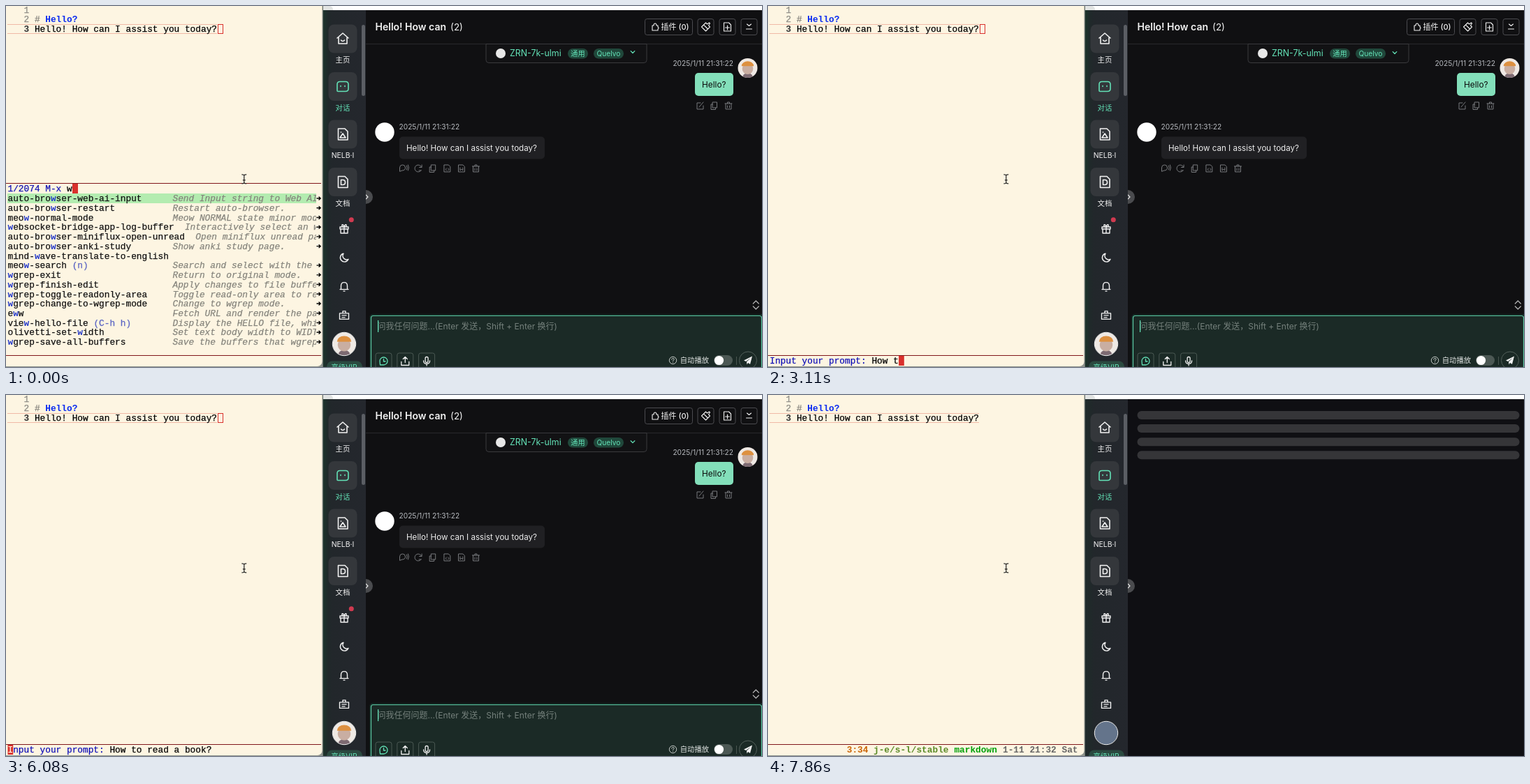
Animation of 1082 by 518 pixels, one loop 8000 ms. Source, as an HTML page with a canvas:

```html
<!DOCTYPE html>
<html lang="zh-CN">
<head>
<meta charset="utf-8">
<title>Prompt to chat</title>
<style>
html, body { margin: 0; width: 100%; height: 100%; overflow: hidden; background: #111; }
canvas { display: block; width: 1082px; height: 518px; }
</style>
</head>
<body>
<canvas id="stage" width="1082" height="518"></canvas>
<script>
const g = document.getElementById('stage').getContext('2d');
const LOOP = 8000, PROMPT_AT = 445, SENT_AT = 6075, LOAD_AT = 6225, SHELL_AT = 7265;
const CH = 7.68, ROW = 13.73, X0 = 2.5;
const MINT = '#63e2b7', RED = '#d9302c', PAPER = '#fdf5e2', RULE = '#80161a', DIM = '#77797c', WHITE = '#f2f2f2';

const PROMPT = 'How to read a book?';
const KEYS = [2065, 2215, 2505, 2655, 2955, 3255, 3330, 3405, 3555, 3705,
  3855, 4005, 4155, 4445, 4595, 4745, 4895, 5035, 5245];

const COMMANDS = [
  ['auto-browser-web-ai-input', 'Send Input string to Web AI'],
  ['auto-browser-restart', 'Restart auto-browser.'],
  ['meow-normal-mode', 'Meow NORMAL state minor mode.'],
  ['websocket-bridge-app-log-buffer', 'Interactively select an websocket'],
  ['auto-browser-miniflux-open-unread', 'Open miniflux unread page.'],
  ['auto-browser-anki-study', 'Show anki study page.'],
  ['mind-wave-translate-to-english', ''],
  ['meow-search', 'Search and select with the current', '(n)'],
  ['wgrep-exit', 'Return to original mode.'],
  ['wgrep-finish-edit', 'Apply changes to file buffers.'],
  ['wgrep-toggle-readonly-area', 'Toggle read-only area to remove'],
  ['wgrep-change-to-wgrep-mode', 'Change to wgrep mode.'],
  ['eww', 'Fetch URL and render the page.'],
  ['view-hello-file', 'Display the HELLO file, which', '(C-h h)'],
  ['olivetti-set-width', 'Set text body width to WIDTH'],
  ['wgrep-save-all-buffers', 'Save the buffers that wgrep']
];

function rect(x, y, w, h, color) {
  g.fillStyle = color;
  g.fillRect(x, y, w, h);
}

function box(x, y, w, h, r, fill, line, lw = 1) {
  g.beginPath();
  g.roundRect(x, y, w, h, r);
  if (fill) { g.fillStyle = fill; g.fill(); }
  if (line) { g.strokeStyle = line; g.lineWidth = lw; g.stroke(); }
}

function disc(x, y, r, fill, line, lw = 1) {
  g.beginPath();
  g.arc(x, y, r, 0, 7);
  if (fill) { g.fillStyle = fill; g.fill(); }
  if (line) { g.strokeStyle = line; g.lineWidth = lw; g.stroke(); }
}

// y is the middle of the capitals
function label(s, x, y, size, color, align = 'left', weight = 400) {
  g.font = `${weight} ${size}px Inter, "Noto Sans CJK SC", "Noto Sans CJK", sans-serif`;
  g.textAlign = align;
  g.fillStyle = color;
  g.fillText(s, x, y + size * 0.36);
}

// A hairline outline gives the medium weight
function mono(s, x, y, color, style = '') {
  g.font = `${style} 12.8px "Liberation Mono", monospace`;
  g.textAlign = 'left';
  g.fillStyle = g.strokeStyle = color;
  g.fillText(s, x, y + 4.2);
  if (style === 'bold') return;
  g.lineWidth = 0.25;
  g.strokeText(s, x, y + 4.2);
}

function icon(x, y, d, color, lw = 1.1, fill = false) {
  const path = new Path2D(d);
  g.save();
  g.translate(x, y);
  g.strokeStyle = g.fillStyle = color;
  g.lineWidth = lw;
  g.lineJoin = g.lineCap = 'round';
  if (fill) g.fill(path);
  else g.stroke(path);
  g.restore();
}

const ICON = {
  home: 'M-8-1 0-8 8-1M-6-2V7H6V-2M-2.5 2Q0 5 2.5 2',
  chat: 'M-4-7H4Q8-7 8-3V3Q8 7 4 7H-7Q-8 7-8 6V-3Q-8-7-4-7ZM-3-1V0M3-1V0',
  page: 'M-6.5-8H3L7-4V8H-6.5Z',
  hill: 'M-4 5 0-1 4 5ZM-2.5-3V-2.8',
  letter: 'M-2.5-3H0Q3.5-3 3.5 0.5Q3.5 4 0 4H-2.5Z',
  gift: 'M-6-3H6V0H-6ZM-5 0V6H5V0M0-3V6M0-3Q-4-3-3-6Q-1-7 0-3Q1-7 3-6Q4-3 0-3',
  moon: 'M-1-6A6 6 0 1 0 6 2A5.5 5.5 0 0 1-1-6Z',
  bell: 'M-6 4H6M-4.5 4V-1Q-4.5-6 0-6Q4.5-6 4.5-1V4M-1 6.5H1',
  case: 'M-6.5-3H6.5V5.5H-6.5ZM-2-3V-6H2V-3M-3 0H3M-3 3H1',
  edit: 'M1-4H-4V5H5V0M-1 2 5-5',
  copy: 'M-2-5H4V3H-2ZM-2-2H-4.5V5.5H2V3',
  bin: 'M-5-3H5M-4-3V5H4V-3M-1.5-3V-5H1.5V-3M-1.5 0V3M1.5 0V3',
  voice: 'M-6 4V-1Q-6-5-2-5Q2-5 2-1Q2 3-2 3ZM4-4Q5.5-1 4 2M6-5Q8-1 6 3',
  redo: 'M4 3A5 5 0 1 1 4.5-2M5-5V-1.5H1.5M4 3H1',
  file: 'M-4-5H2L4.5-2.5V5H-4Z',
  code: 'M-1 0-2 1.5-1 3M1.5 0 2.5 1.5 1.5 3',
  word: 'M-2-1V3L0 1 2 3V-1',
  plug: 'M-4-2H-2Q-2-5 0-5Q2-5 2-2H4V0Q6 2 4 3V5H-4Z',
  brush: 'M-6 0 0-6 2-4 5-6 6-5 4-2 6 0 0 6ZM-3-3 3 3',
  addFile: 'M-5-6H2L5-3V6H-5ZM0-2V4M-3 1H3',
  fold: 'M-3-4 0-1.5 3-4M-4 3H4',
  down: 'M-2.8-1.4 0 1.4 2.8-1.4',
  upDown: 'M-4-2 0-6 4-2M-4 2 0 6 4 2',
  clock: 'M-5 5.5H0A5.5 5.5 0 1 0-5.5 0ZM0-3V0.5H2.5',
  share: 'M-5.5 1V6H5.5V1M0 2V-6M-3-3 0-6 3-3',
  mic: 'M-2-4Q-2-6 0-6Q2-6 2-4V0Q2 2 0 2Q-2 2-2 0ZM-4.5-0.5Q-4.5 4 0 4Q4.5 4 4.5-0.5M0 4V6.5',
  plane: 'M-6 0 6-6 3 5.5 0 3.5-1.5 6-2 2 4-3.5-3 1.5Z',
  ask: 'M-1.7-1.3Q-1.5-3 0-3Q2-3 1.7-1.2Q0 0 0 1M0 3V3.1'
};

// Plain faceless head and shoulders on a pale disc
function portrait(x, y, r) {
  g.save();
  disc(x, y, r, '#efe9e4');
  g.clip();
  g.translate(x, y);
  g.scale(r, r);
  disc(0, 1.05, 0.55, '#7d6a72');
  disc(0, 0.08, 0.56, '#c9aea2');
  g.beginPath();
  g.ellipse(0, -0.2, 0.62, 0.5, 0, Math.PI, 0);
  g.fillStyle = '#dd9040';
  g.fill();
  g.restore();
}

const blinkOn = idle => idle < 500 || Math.floor(idle / 500) % 2 === 0;

function drawCommands() {
  rect(0, 254, 451, 1, RULE);
  mono('1/2074 M-x', X0, 262, '#1414b4');
  mono('w', X0 + 11 * CH, 262, '#000');
  rect(95, 255, 8, 14, RED);
  rect(2, 269, 442, 14, '#b3ecb0');
  COMMANDS.forEach(([name, note, key], i) => {
    const y = 276 + i * ROW, at = name.indexOf('w');
    mono(name.slice(0, at), X0, y, '#111');
    mono('w', X0 + at * CH, y, '#1f35c8', 'bold');
    mono(name.slice(at + 1), X0 + (at + 1) * CH, y, '#111');
    if (key) mono(key, X0 + (name.length + 1) * CH, y, '#5c66c4');
    if (!note) return;
    g.save();
    g.beginPath();
    g.rect(0, y - 8, 444, 16);
    g.clip();
    mono(note, name.length > 29 ? X0 + (name.length + 2) * CH : 238.5, y, '#85847c', 'italic');
    g.restore();
    icon(447.5, y, 'M-2.5 0H2.5M0.5-2 2.7 0 0.5 2', '#000', 1.4);
  });
}

function drawPrompt(t) {
  const n = KEYS.filter(k => k <= t).length;
  const sent = t >= SENT_AT;
  const last = sent ? SENT_AT : n ? KEYS[n - 1] : PROMPT_AT;
  mono('Input your prompt:', X0, 509, '#1010b8');
  mono(PROMPT.slice(0, n), X0 + 19 * CH, 509, '#000');
  if (!blinkOn(t - last)) return;
  rect(sent ? 2.5 : X0 + (19 + n) * CH + 0.3, 502, 7.7, 14, RED);
  if (sent) mono('I', X0, 509, PAPER);
}

function drawModeLine() {
  mono('3:34', 112.7, 509, '#cb6608', 'bold');
  mono('j-e/s-l/stable', 151, 509, '#5a8a26', 'bold');
  mono('markdown', 266.4, 509, '#00a008', 'bold');
  mono('1-11 21:32 Sat', 336, 509, '#666', 'bold');
}

function drawEditor(t) {
  rect(0, 0, 456, 518, '#8d928c');
  box(-10, -10, 462.5, 527, 7, PAPER);
  mono('1', X0 + 3 * CH, 5.3, '#8f8d86');
  mono('2', X0 + 3 * CH, 19, '#8f8d86');
  mono('3', X0 + 3 * CH, 32.7, '#333', 'bold');
  mono('#', X0 + 5 * CH, 19, '#85837c');
  mono('Hello?', X0 + 7 * CH, 19, '#0a2bf0', 'bold');
  rect(2, 26, 300, 1, '#f0b9a6');
  rect(2, 39, 300, 1, '#f0b9a6');
  mono('Hello! How can I assist you today?', X0 + 5 * CH, 32.7, '#000');
  if (t < LOAD_AT) {
    g.strokeStyle = RED;
    g.lineWidth = 1;
    g.strokeRect(303.5, 26.5, 7, 13);
  } else if (blinkOn(t - LOAD_AT)) {
    rect(303, 26, 7.5, 14, RED);
  }
  rect(0, 501, 451, 1, RULE);
  if (t < PROMPT_AT) drawCommands();
  else if (t < LOAD_AT) drawPrompt(t);
  else drawModeLine();
  icon(340.8, 248.3, 'M-3-6.5Q0-6.5 0-5Q0-6.5 3-6.5M0-5V5M-3 6.5Q0 6.5 0 5Q0 6.5 3 6.5M-1.5 1.5H1.5', '#222', 1.2);
}

function drawSidebar(ready) {
  const shade = g.createLinearGradient(454, 0, 515, 0);
  shade.addColorStop(0, ready ? '#1c342b' : '#1f2b2c');
  shade.addColorStop(0.12, '#20292a');
  shade.addColorStop(0.2, '#22272b');
  shade.addColorStop(1, '#24272d');
  rect(454, 6, 61, 512, shade);
  box(509, 27, 5, 102, 2.5, '#5b5e64');
  [['主页', 'home'], ['对话', 'chat'], ['NELB·I', 'page', 'hill'], ['文档', 'page', 'letter']]
    .forEach(([name, ...parts], i) => {
      const y = 47 + i * 68.5, color = i === 1 ? MINT : WHITE;
      box(461.5, y - 20.5, 41, 41, 8, '#34373b');
      parts.forEach(p => icon(482, y, ICON[p], color, 1.6));
      label(name, 482, y + 30.5, 10.4, color, 'center');
    });
  ['gift', 'moon', 'bell', 'case'].forEach((p, i) => icon(484, 320 + i * 41.3, ICON[p], WHITE, 1.4));
  if (ready) {
    disc(494.3, 306.7, 3.5, '#d03a50');
    portrait(484, 485, 16.5);
  } else {
    disc(484, 485, 16.5, '#64748b');
  }
  disc(484, 485, 16.7, null, '#eee', 1);
  box(459, 509.5, 51, 20, 8, '#2b4a40');
  label('高级VIP', 484, 518, 10.3, MINT, 'center');
}

function drawHandle() {
  g.save();
  g.beginPath();
  g.rect(515, 260, 20, 30);
  g.clip();
  disc(515, 274, 10, '#4a4b4e');
  icon(516.5, 274, 'M-1.5-3 1.5 0-1.5 3', '#eee', 1.1);
  g.restore();
}

// Hops off the floor once a second, slow near the top
function hop(t) {
  const u = (t / 1000 + 0.91) % 1;
  const p = u < 0.5 ? 1 - u * 2 : u * 2 - 1;
  return -3 * (1 - p ** 3);
}

function drawHeader(t) {
  rect(515, 54, 567, 1, '#29292c');
  label('Hello! How can', 528.5, 30, 14, WHITE, 'left', 600);
  label('(2)', 636, 30, 13.4, WHITE);
  box(914.5, 18.5, 68, 23, 3, null, '#4b4b4f');
  icon(929, 30, ICON.plug, WHITE);
  label('插件 (0)', 937.5, 30, 11, WHITE, 'left', 500);
  ['brush', 'addFile', 'fold'].forEach((p, i) => {
    box(990 + i * 31, 18.5, 23, 23, 3, null, '#4b4b4f');
    icon(1001.5 + i * 31, 30, ICON[p], WHITE);
  });
  box(687, 54.5, 230, 27, [0, 0, 4, 4], '#121214', '#3a3a3d');
  disc(708, 68, 7, '#e8e8e8');
  label('ZRN-7k-ulmi', 721, 68, 12.4, MINT);
  box(804, 61, 29, 14.5, 7.2, '#20483b');
  label('通用', 818.5, 68.3, 10.2, MINT, 'center');
  box(841, 61, 43, 14.5, 7.2, '#20483b');
  label('Quelvo', 862.5, 68.3, 10.2, MINT, 'center');
  icon(897, 67.4 + hop(t), ICON.down, MINT, 1.3);
}

function drawMessages() {
  const stamp = '2025/1/11 21:31:22';
  label(stamp, 1041, 82, 10.2, '#b7babf', 'right');
  portrait(1061.5, 89, 14);
  box(986, 96, 55, 33, 5, '#83dfba');
  label('Hello?', 1013.3, 112.5, 11.8, '#0b0b0b', 'center');
  ['edit', 'copy', 'bin'].forEach((p, i) => icon(993 + i * 20.5, 143, ICON[p], DIM, 1));
  disc(542, 181, 13.7, '#fff');
  label(stamp, 562.5, 173.5, 10.2, '#b7babf');
  box(563, 187.5, 208, 32, 5, '#202023');
  label('Hello! How can I assist you today?', 573, 203.5, 11.6, '#ececec');
  [['voice'], ['redo'], ['copy'], ['file', 'code'], ['file', 'word'], ['bin']].forEach((parts, i) =>
    parts.forEach(p => icon(569.5 + i * 20.6, 233, ICON[p], DIM, 1)));
  icon(1073.3, 429, ICON.upDown, '#b5b5b5', 1.2);
}

function drawInput(t) {
  box(521, 443, 570, 90, 4, null, '#16312a', 1.5);
  box(522.5, 444.5, 559, 90, 3, '#1b2a26', '#5cc9a4', 1.2);
  label('问我任何问题...(Enter 发送，Shift + Enter 换行)', 531.5, 460, 12, '#75807c');
  const beat = t % 1000;
  if (beat < 200 || beat >= 700) rect(532, 451, 1.2, 17, MINT);
  ['clock', 'share', 'mic'].forEach((p, i) => {
    box(529 + i * 30.8, 498, 23, 26, 3, null, '#4a5853');
    icon(540.5 + i * 30.8, 509.5, ICON[p], i ? WHITE : MINT, 1.3);
  });
  disc(954.5, 508.5, 5.2, null, '#c9cecb');
  icon(954.5, 508.5, ICON.ask, '#c9cecb', 1);
  label('自动播放', 964.8, 508.5, 10.3, '#dfe3e1');
  box(1013, 501, 27, 15, 7.5, '#4c5854');
  disc(1020.5, 508.5, 6.6, '#fff');
  rect(1045, 503, 1, 12, '#48554f');
  disc(1062, 508.5, 12.5, null, '#53605b');
  icon(1062, 508.5, ICON.plane, WHITE, 1, true);
}

function drawLoading(t) {
  rect(454, 6, 628, 512, '#111111');
  rect(454, 6, 23, 512, '#0e0f0f');
  const p = (t - LOAD_AT) % 1000 / 1000;
  g.globalAlpha = 0.4 * (1 - p);
  disc(771, 257, 1.3 + 14 * p, MINT);
  g.globalAlpha = 1;
  disc(771, 257, 18.6, null, MINT, 4);
  label('Loading...', 771, 302, 13.3, MINT, 'center');
}

function drawBrowser(t) {
  rect(454, 0, 628, 518, '#fff');
  box(454, 0, 14, 10, [0, 5, 0, 0], '#e2e4e3');
  if (t >= LOAD_AT && t < SHELL_AT) {
    drawLoading(t);
    return;
  }
  const ready = t < LOAD_AT;
  rect(515, 6, 567, 512, ready ? '#101012' : '#0f0f13');
  drawSidebar(ready);
  if (ready) {
    drawHeader(t);
    drawMessages();
    drawInput(t);
  } else {
    for (let i = 0; i < 4; i++) box(528.5, 23 + i * 19.1, 547, 12, 6, '#353538');
  }
  drawHandle();
}

function draw(t) {
  drawEditor(t);
  drawBrowser(t);
  rect(453, 0, 1, 518, '#6f7671');
}

let start;
function tick(now) {
  start ??= now;
  draw((now - start) % LOOP);
  requestAnimationFrame(tick);
}
draw(0);
requestAnimationFrame(tick);
</script>
</body>
</html>
```
